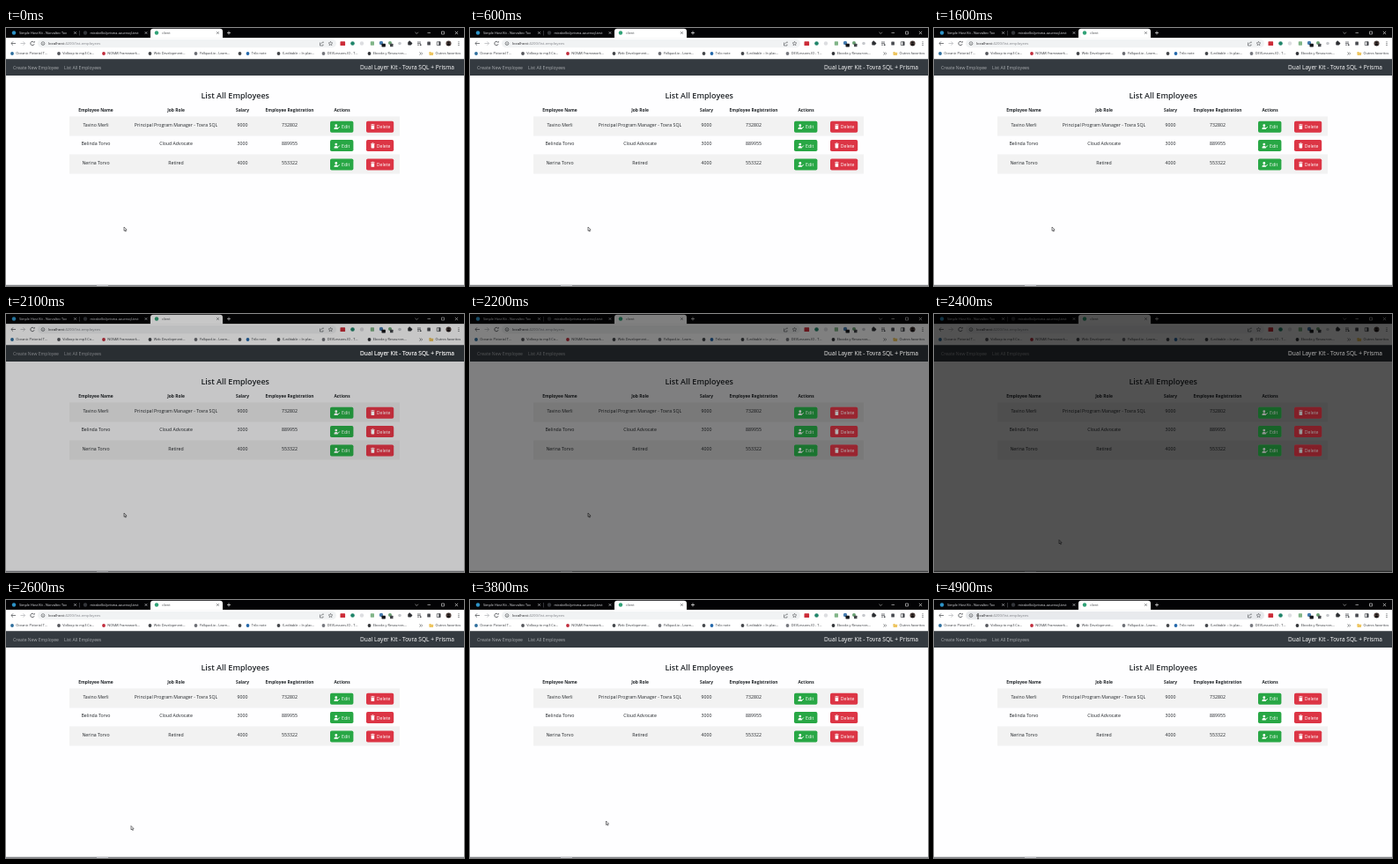
Write an HTML page with a canvas that moves like this. It is 520 px wide and 293 px high and loops after 5 s.

```html
<!DOCTYPE html>
<html lang="en">
<head>
<meta charset="utf-8">
<title>client</title>
<style>
html, body { margin: 0; width: 100%; height: 100%; overflow: hidden; background: #fff; }
canvas { display: block; width: 520px; height: 293px; }
</style>
</head>
<body>
<canvas id="stage"></canvas>
<script>
const W = 520, H = 293, LOOP = 5000, STEP = 100;
const FONT = '"Open Sans", "Noto Sans", sans-serif';
const INK = '#44474b', DARK = '#212529';
const canvas = document.getElementById('stage');
const ctx = canvas.getContext('2d');
const dpr = Math.max(1, window.devicePixelRatio || 1);
canvas.width = W * dpr;
canvas.height = H * dpr;

function box(x, y, w, h, color, r = 0) {
  ctx.fillStyle = color;
  ctx.beginPath();
  ctx.roundRect(x, y, w, h, r);
  ctx.fill();
}

function dot(x, y, r, color) {
  ctx.fillStyle = color;
  ctx.beginPath();
  ctx.arc(x, y, r, 0, Math.PI * 2);
  ctx.fill();
}

function line(points, color, width = 0.7, close = false) {
  ctx.strokeStyle = color;
  ctx.lineWidth = width;
  ctx.beginPath();
  points.forEach(([x, y]) => ctx.lineTo(x, y));
  if (close) ctx.closePath();
  ctx.stroke();
}

function poly(points, color) {
  ctx.fillStyle = color;
  ctx.beginPath();
  points.forEach(([x, y]) => ctx.lineTo(x, y));
  ctx.fill();
}

// cy is the middle of the capitals
function text(str, x, cy, size, color, align = 'left', weight = 400) {
  ctx.font = `${weight} ${size}px ${FONT}`;
  ctx.textAlign = align;
  ctx.fillStyle = color;
  ctx.fillText(str, x, cy + size * 0.36);
}

function cross(x, y, r, color) {
  line([[x - r, y - r], [x + r, y + r]], color);
  line([[x - r, y + r], [x + r, y - r]], color);
}

function tabStrip() {
  box(0, 0, W, 11.5, '#030305');
  dot(9, 5.5, 2.2, '#2d93c8');
  text('Simple Host Kit - Norvaltec Tov', 15, 5.7, 3.8, '#e4e5e8');
  cross(78.5, 5.5, 1.2, '#d5d6da');
  line([[83.5, 3], [83.5, 8.5]], '#55575c', 0.6);
  dot(90, 5.5, 2.2, '#33353a');
  text('mirabelks/prisma-azuresql-test', 95.5, 5.7, 3.8, '#e4e5e8');
  cross(159, 5.5, 1.2, '#d5d6da');
  box(164, 0.8, 82, 11, '#fff', [3, 3, 0, 0]);
  dot(171, 5.5, 2.2, '#30a277');
  text('client', 177, 5.7, 3.8, INK);
  cross(240.5, 5.5, 1.2, INK);
  line([[251, 5.5], [255, 5.5]], '#eee');
  line([[253, 3.5], [253, 7.5]], '#eee');
  line([[464.5, 4.8], [466.3, 6.5], [468, 4.8]], '#ccc', 0.6);
  line([[478.5, 5.5], [482, 5.5]], '#ddd', 0.6);
  line([[494.5, 4], [497.5, 4], [497.5, 7], [494.5, 7]], '#ddd', 0.6, true);
  cross(511.5, 5.5, 1.6, '#ddd');
}

function toolbar(hover) {
  box(0, 11.3, W, 24.2, '#fff');
  box(36, 13, 339, 9.2, hover ? '#e8eaed' : '#f1f3f4', 4.6);
  line([[11, 17.5], [6, 17.5]], INK);
  line([[8, 15.4], [5.9, 17.5], [8, 19.6]], INK);
  line([[16.5, 17.5], [21.5, 17.5]], '#b0b2b6');
  line([[19.5, 15.4], [21.6, 17.5], [19.5, 19.6]], '#b0b2b6');
  ctx.strokeStyle = INK;
  ctx.lineWidth = 0.8;
  ctx.beginPath();
  ctx.arc(30, 17.5, 2.2, 0.3, 5.3);
  ctx.stroke();
  poly([[30.8, 16.6], [32.6, 16.6], [32.6, 14.8]], INK);
  ctx.lineWidth = 0.6;
  ctx.beginPath();
  ctx.arc(42, 17.6, 1.9, 0, 7);
  ctx.stroke();
  line([[42, 17.2], [42, 18.7]], INK, 0.6);
  text('localhost', 48, 17.7, 4.3, '#202124');
  const x = 48 + ctx.measureText('localhost').width;
  text(':4200/list-employees', x, 17.7, 4.3, '#808388');

  line([[356.5, 16.5], [356.5, 20], [360, 20], [360, 18.5]], INK, 0.6);
  line([[357.6, 18.2], [359, 16.2], [361, 16.2]], INK, 0.6);
  const star = [];
  for (let i = 0; i < 10; i++) {
    const a = i * Math.PI / 5 - Math.PI / 2, r = i % 2 ? 1.1 : 2.5;
    star.push([368.5 + r * Math.cos(a), 17.7 + r * Math.sin(a)]);
  }
  line(star, INK, 0.5, true);

  box(379.5, 15.3, 5.6, 4.8, '#cc2c38', 0.6);
  dot(393.5, 17.5, 2.3, '#20856a');
  dot(404, 17.5, 2.2, '#dcdde0');
  box(413.8, 15.3, 4.2, 4.4, '#81b588', 0.6);
  dot(426, 17, 2.2, '#467cb0');
  box(426.5, 17.7, 4.4, 3.7, '#16181c', 0.6);
  dot(436, 17, 2, '#6ba174');
  box(436, 17.7, 3.5, 3.6, '#44474b', 0.6);
  dot(447, 17.5, 1.8, '#c6c8cc');
  box(456.3, 15.6, 4, 4, '#2e3034', 0.8);
  dot(460.3, 17.6, 1, '#2e3034');
  dot(458.2, 15.4, 1, '#2e3034');
  for (const [y, end] of [[16, 471], [17.6, 471], [19.2, 469]]) line([[467, y], [end, y]], INK);
  dot(470.7, 19.2, 0.9, INK);
  box(478.3, 15.6, 3.6, 4, '#484a50', 0.5);
  line([[489.3, 15.7], [493, 15.7], [493, 19.6], [489.3, 19.6]], INK, 0.7, true);
  box(491.3, 15.5, 2, 4.2, INK);
  dot(502.5, 17.6, 3, '#4a3c38');
  dot(502.5, 16.7, 1.1, '#151214');
  box(500.8, 18, 3.4, 2, '#151214', [1.5, 1.5, 0.5, 0.5]);
  for (let i = -1; i < 2; i++) dot(514, 17.6 + i * 1.8, 0.55, INK);
}

const bookmarks = [
  [7, '#2d6d9c', 'Oceanic Pictorial T…'],
  [60, '#55575c', 'Vidloop to mp3 Co…'],
  [111, '#c12c3c', 'NOVAR Framework…'],
  [163.5, '#44474b', 'Web Development…'],
  [215.5, '#6c6e74', 'Yolkpad.io - Learn…'],
  [265.5, '#44474b', ''],
  [274.5, '#2468ab', 'Trilo note'],
  [309.5, '#44474b', 'X-editable :: In plac…'],
  [360.5, '#76787e', 'DEVLessons.IO - T…'],
  [412.5, '#34363a', 'Ebooks y Resources…']
];

function bookmarkBar() {
  for (const [x, color, label] of bookmarks) {
    dot(x, 29, 1.9, color);
    text(label, x + 4.3, 29.1, 3.8, '#303338');
  }
  for (const x of [469.5, 471.3]) {
    line([[x, 27.5], [x + 1.4, 29], [x, 30.5]], INK, 0.6);
  }
  box(480.5, 27.8, 4.6, 3.2, '#eec560', 0.4);
  box(480.5, 27.1, 2, 1.2, '#eec560', 0.3);
  text('Outros favoritos', 487.5, 29.1, 3.8, '#303338');
}

function appTitle(color) {
  text('Dual Layer Kit - Tovra SQL + Prisma', 509, 45, 6.6, color, 'right');
}

function navbar() {
  box(0, 35.3, W, 18.7, '#343a40');
  text('Create New Employee', 8, 45, 5.1, '#a8abae');
  text('List All Employees', 66, 45, 5.1, '#a8abae');
  appTitle('#fff');
}

const columns = [
  [102, 'Employee Name'], [193, 'Job Role'], [268.5, 'Salary'],
  [322, 'Employee Registration'], [381.5, 'Actions']
];
const rows = [
  ['Tavino Merli', 'Principal Program Manager - Tovra SQL', '9000', '732802'],
  ['Belinda Torvo', 'Cloud Advocate', '3000', '889955'],
  ['Nerina Torvo', 'Retired', '4000', '553322']
];
const rowY = i => 110.2 + i * 21.4;

function table() {
  text('List All Employees', 260.2, 76.5, 9, DARK, 'center', 600);
  box(72, 100.6, 375, 22, '#f2f2f2');
  box(72, 143.6, 375, 22, '#f2f2f2');
  for (const [x, label] of columns) text(label, x, 93.2, 4.9, DARK, 'center', 700);
  rows.forEach((row, i) => {
    row.forEach((cell, j) => text(cell, columns[j][0], rowY(i), 5.2, DARK, 'center'));
  });
}

function editButton(y) {
  box(368, y - 6.5, 26.4, 13, '#28a745', 1.8);
  dot(374.8, y - 1.5, 1.4, '#fff');
  box(372.5, y + 0.4, 4.4, 2.4, '#fff', [1.8, 1.8, 0.3, 0.3]);
  line([[376.6, y + 2.2], [378.8, y - 0.1]], '#fff', 0.9);
  text('Edit', 381, y + 0.1, 5.2, '#fff');
}

function deleteButton(y) {
  box(409, y - 6.5, 31.2, 13, '#dc3545', 1.8);
  box(414.2, y - 2.6, 4.4, 0.7, '#fff');
  box(415.5, y - 3.2, 1.8, 0.7, '#fff');
  box(414.6, y - 1.5, 3.6, 4.3, '#fff', [0, 0, 0.6, 0.6]);
  text('Delete', 420.8, y + 0.1, 5.2, '#fff');
}

function buttons(shade) {
  const veil = `rgba(0,0,0,${shade})`;
  rows.forEach((_, i) => {
    const y = rowY(i) + 2;
    editButton(y);
    deleteButton(y);
    box(368, y - 6.5, 26.4, 13, veil, 1.8);
    box(409, y - 6.5, 31.2, 13, veil, 1.8);
  });
}

function lerp(keys, t) {
  let i = 0;
  while (i < keys.length - 2 && t >= keys[i + 1][0]) i++;
  const a = keys[i], b = keys[i + 1];
  const k = Math.min(1, Math.max(0, (t - a[0]) / (b[0] - a[0])));
  return a.slice(1).map((v, j) => v + (b[j + 1] - v) * k);
}

const path = [
  [0, 134, 226], [2299, 134, 226], [2300, 142, 256.5], [3100, 142, 256.5],
  [3400, 151, 254], [3500, 151, 254], [3800, 154.5, 251], [4100, 150, 239],
  [4400, 110, 150], [4700, 60, 43], [4800, 52, 25], [4900, 50, 18.5]
];
const fade = [[2000, 1], [2100, 0.78], [2200, 0.5], [2300, 0.17], [2400, 0.32], [2500, 0.65], [2600, 1]];

function pointer(t) {
  const [x, y] = lerp(path, t);
  if (t >= 4800) {
    line([[x, y - 2.6], [x, y + 2.6]], '#111', 0.7);
    line([[x - 1, y - 2.7], [x + 1, y - 2.7]], '#111', 0.6);
    line([[x - 1, y + 2.7], [x + 1, y + 2.7]], '#111', 0.6);
    return;
  }
  const arrow = [[0, 0], [0, 4.4], [1, 3.6], [1.7, 5.1], [2.4, 4.8], [1.7, 3.3], [3.1, 3.2]]
    .map(([dx, dy]) => [x + dx, y + dy]);
  poly(arrow, '#fff');
  line(arrow, '#2a2a2e', 0.6, true);
}

function draw(t) {
  const [light] = lerp(fade, t);
  ctx.setTransform(dpr, 0, 0, dpr, 0, 0);
  box(0, 0, W, H, '#fefeff');
  tabStrip();
  toolbar(t >= 4800);
  bookmarkBar();
  navbar();
  table();
  box(0, 291.8, W, 1.2, '#85878c');
  box(103, 291.8, 13, 1.2, '#c0c2c8');
  pointer(t);
  if (light < 1) {
    const gray = 255 * light, soft = 255 * light ** 0.45;
    ctx.globalCompositeOperation = 'multiply';
    box(0, 0, W, H, `rgb(${gray},${gray},${gray})`);
    ctx.globalCompositeOperation = 'source-over';
    // the app title keeps more of its brightness
    appTitle(`rgb(${soft},${soft},${soft})`);
  }
  buttons((1 - light) * 0.6);
}

const start = performance.now();
function tick() {
  const t = (performance.now() - start) % LOOP;
  draw(Math.floor(t / STEP) * STEP);
  requestAnimationFrame(tick);
}
tick();
</script>
</body>
</html>
```
